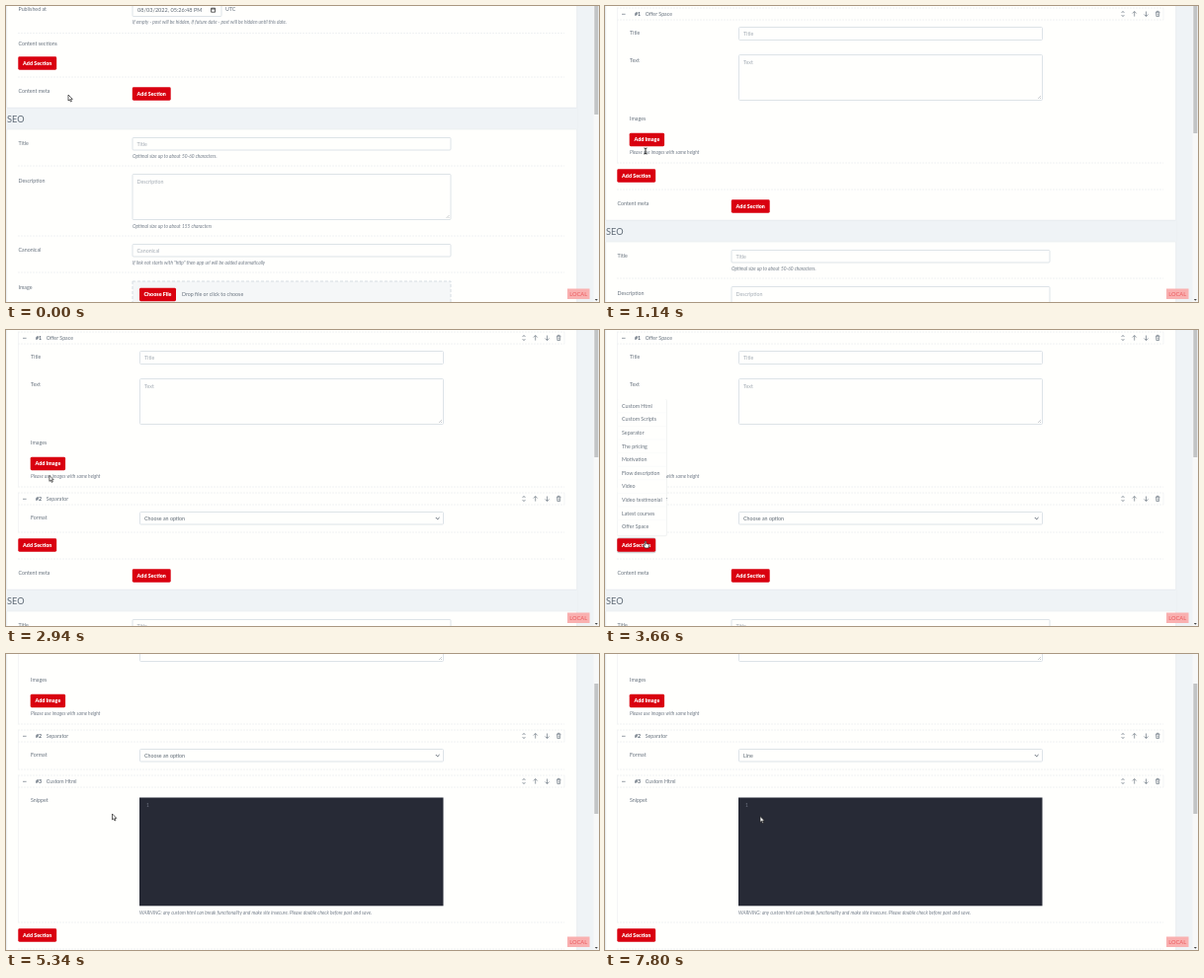
These frames come from a looping animation (600x300 px, 8 s). An HTML page:

```html
<!DOCTYPE html>
<html lang="en">
<head>
<meta charset="utf-8">
<title>Adding content sections</title>
<style>
html, body { margin: 0; width: 100%; height: 100%; overflow: hidden; background: #eff3f6; }
svg { display: block; width: 100vw; height: 100vh; }
text { font-family: Lato, "Open Sans", sans-serif; font-size: 5.3px; fill: #68737f; white-space: pre; }
.hint { font-size: 4.8px; font-style: italic; fill: #737d8a; }
.faint { fill: #a3abb4; }
.strong { font-weight: 700; fill: #566270; }
.button { font-weight: 900; font-size: 5.35px; fill: #fff; text-anchor: middle; }
.heading { font-size: 9.2px; fill: #5f6a76; }
</style>
</head>
<body>
<svg id="stage" viewBox="0 0 600 300" preserveAspectRatio="none"></svg>
<script>
const LOOP = 8000;
const CARD = '#fffffd', RED = '#d9000f', EDGE = '#d5dce2', LINE = '#eff1f2';
const FIRST_Y = 57;
const HEIGHTS = [163, 46, 155];
const ADDED = [600, 2580, 4980];
const MENU_TIMES = [[300, 600], [1740, 2580], [3420, 4980]];
const OPTIONS = ['Custom Html', 'Custom Scripts', 'Separator', 'The pricing', 'Motivation',
  'Flow description', 'Video', 'Video testimonial', 'Latest courses', 'Offer Space'];
const ITEM_STEP = 13.6, ITEM_TOP = -141;

// time, value pairs
const SCROLL = [[600, 0], [840, 49], [5040, 49], [5300, 137]];
const THUMB_END = [[600, 110], [840, 129], [5040, 129], [5300, 162]];

// time, x, y, shape used while heading away from this point
const POINTER = [
  [0, 63, 90, 'arrow'], [60, 63, 90, 'arrow'], [240, 40, 56, 'hand'], [360, 40, 56, 'hand'],
  [540, 42, 39, 'hand'], [660, 42, 40, 'arrow'], [1080, 41, 143, 'beam'], [1140, 41, 147, 'beam'],
  [1260, 42, 157, 'arrow'], [1440, 45, 171, 'hand'], [1800, 46, 171, 'hand'], [2220, 51, 154.5, 'hand'],
  [2520, 48, 56, 'hand'], [2640, 48, 56, 'arrow'], [3180, 41, 212, 'hand'], [3360, 41, 214, 'hand'],
  [4140, 41, 214, 'hand'], [4860, 42.5, 74.5, 'hand'], [5040, 43, 76, 'arrow'], [5340, 107.5, 162, 'arrow'],
  [5700, 150, 112, 'arrow'], [6000, 150, 112, 'arrow'], [6300, 180, 102, 'arrow'], [6660, 180, 102, 'arrow'],
  [6840, 160, 121, 'arrow'], [6960, 160, 121, 'arrow'], [7260, 157, 164.5, 'arrow']
];

const rect = (x, y, w, h, fill, extra = '') =>
  `<rect x="${x}" y="${y}" width="${w}" height="${h}" fill="${fill}" ${extra}/>`;
const label = (x, y, value, cls = '') => `<text x="${x}" y="${y + 1.8}" class="${cls}">${value}</text>`;
const path = (d, color = '#6b7682', width = .7) =>
  `<path d="${d}" fill="none" stroke="${color}" stroke-width="${width}"/>`;
const rule = (y, x = 12, end = 565) =>
  `<path d="M${x} ${y}H${end}" stroke="${LINE}" stroke-width=".9" stroke-dasharray="2 1"/>`;
const box = (x, y, w, h) => rect(x, y, w, h, CARD, `rx="1" stroke="${EDGE}" stroke-width=".8"`);
const field = (x, y, w, h, hint) => box(x, y, w, h) + label(x + 4.5, y + (h > 20 ? 8 : h / 2), hint, 'faint');
const button = (x, cy, w, value) =>
  rect(x, cy - 6.75, w, 13.5, RED, 'rx="1.4"') +
  `<text x="${x + w / 2}" y="${cy + 1.8}" class="button">${value}</text>`;
const grip = (x, y) => path(`M${x - 4} ${y - 1}l3-3M${x - 2} ${y - 1}l1-1`, '#9aa1a8', .5);
const group = (id, content) => `<g id="${id}">${content}</g>`;

function header(number, name) {
  return rule(-6) + rule(6) + path('M12.5-6V6M565-6V6', LINE) + path('M17 .3h3.6') +
    label(30, 0, '#' + number, 'strong') + label(40.7, 0, name) +
    path('M522.6-1l1.4-1.7 1.4 1.7M522.6 1l1.4 1.7 1.4-1.7') +
    path('M535.7 2.6v-5M533.7-.5l2-2 2 2') + path('M547.5-2.5v5M545.5.5l2 2 2-2') +
    path('M557-1.7h4.4M558.3-1.8v-.9h1.8v.9M557.6-1.4l.3 4h2.6l.3-4M559.2-.5v2');
}

function sectionBody(height) {
  return path(`M12.5 6V${height - 12}`, LINE) + rule(height - 12);
}

const topPart =
  label(12.5, 3.5, 'Published at') + box(128, -3, 90, 13.5) +
  '<text x="133" y="5.5" style="font-size:5.55px;fill:#5c6773">08/03/2022, 05:26:48 PM</text>' +
  path('M207.6 2.2h4v4h-4zM207.6 3h4', '#333', .8) + label(222, 3.5, 'UTC') +
  label(128, 16.5, 'If empty - post will be hidden, if future date - post will be hidden until this date.', 'hint') +
  rule(27.5) + label(12.5, 38.5, 'Content sections');

const offer = sectionBody(HEIGHTS[0]) + header(1, 'Offer Space') +
  label(25, 19.5, 'Title') + field(135.5, 13.5, 307, 13, 'Title') +
  label(25, 47.5, 'Text') + field(135.5, 41.5, 307, 46, 'Text') + grip(442, 87) +
  label(25, 105.7, 'Images') + button(24.7, 127.5, 35.4, 'Add Image') +
  label(25, 140.3, 'Please use images with same height', 'hint');

const separator = sectionBody(HEIGHTS[1]) + header(2, 'Separator') + label(25, 19.5, 'Format') +
  rect(134.3, 12.2, 309.4, 15, '#d8e5ef', 'id="ring" rx="2"') + box(135.5, 13.5, 307, 12.5) +
  '<text id="choice" x="140" y="21.5" style="fill:#5d6874"></text>' +
  path('M434.8 19l1.9 1.9 1.9-1.9', '#56616c', .9);

const snippet = sectionBody(HEIGHTS[2]) + header(3, 'Custom Html') + label(25, 19.5, 'Snippet') +
  rect(135, 16.5, 307.5, 109.8, '#272a36') +
  '<text x="142" y="26.3" style="font-size:4.8px;fill:#747987">1</text>' +
  rect(147, 20, .8, 9, '#f0f0f0', 'id="caret"') +
  label(135, 132.7, 'WARNING: any custom html can break functionality and make site insecure. Please double check before past and save.', 'hint');

const tail =
  rect(12, -7.8, 39.5, 16, '#8a929a', 'id="shade" rx="2.5" opacity=".38"') +
  button(12.3, 0, 38.9, 'Add Section') + rule(14) +
  label(12.5, 28.3, 'Content meta') + button(127.8, 31, 38.9, 'Add Section') +
  rect(0, 45, 578, 22, '#eff3f6') + path('M1 45.2H577.5', '#e2e7eb') +
  '<text x="1" y="60.2" class="heading">SEO</text>' + path('M1 67H577.5', '#e8ecef') +
  label(12.5, 81.5, 'Title') + field(128, 75.5, 322, 12.5, 'Title') +
  label(128, 94.5, 'Optimal size up to about 50-60 characters.', 'hint') + rule(104) +
  label(12.5, 119, 'Description') + field(128, 112.5, 322, 46, 'Description') + grip(449.5, 158) +
  label(128, 165, 'Optimal size up to about 155 characters', 'hint') + rule(175) +
  label(12.5, 189, 'Canonical') + field(128, 183.5, 322, 12.5, 'Canonical') +
  label(128, 202.5, 'If link not starts with "http" then app url will be added automatically', 'hint') + rule(212) +
  label(12.5, 227.5, 'Image') +
  rect(128, 221, 322, 27, '#f5f7f8', `stroke="${EDGE}" stroke-dasharray="3 2"`) +
  button(135, 234.5, 37, 'Choose File') + label(178, 234.5, 'Drop file or click to choose');

const menu =
  rect(12, -148, 51, 139.3, '#aeb8c1', 'rx="2" opacity=".16"') +
  rect(12.5, -148, 49.5, 138, CARD, 'rx="1.5"') +
  rect(12.5, 0, 49.5, ITEM_STEP, '#f5f7f8', 'id="hover"') +
  OPTIONS.map((name, i) => {
    const y = ITEM_TOP + i * ITEM_STEP;
    return (i ? path(`M12.5 ${y - 6.8}H62`, '#f7f8f8', .6) : '') + label(17, y, name);
  }).join('');

const popup = rect(135, 26.5, 308.5, 17, '#fff', 'stroke="#9da5ac" stroke-width=".7"') +
  rect(135.4, 35, 307.7, 8, '#dfe6ec', 'id="picked"') +
  label(140, 30.8, 'Choose an option') + label(140, 39, 'Line');

const outline = d => `<path d="${d}" fill="#fff" stroke="#222" stroke-width=".7" stroke-linejoin="round"/>`;
const cursors =
  group('arrow', outline('M0 0V6L1.4 4.8 2.4 7 3.4 6.6 2.5 4.4H4.3Z')) +
  group('hand', outline('M-.7.3Q0-.5.7.3V2.6L3.4 3.2Q4 3.4 3.8 4.3L3.1 7H-.5L-2.5 4.2Q-2.3 3.3-.7 4.4Z')) +
  group('beam', path('M-1.5-3Q0-3 0-2V2Q0 3-1.5 3M1.5-3Q0-3 0-2M0 2Q0 3 1.5 3', '#111', .9));

document.getElementById('stage').innerHTML =
  rect(0, 0, 600, 300, '#eff3f6') + rect(1, 0, 576.5, 300, CARD) +
  path('M.7 0V300M577.8 0V300', '#e5eaed') +
  group('top', topPart) + group('section0', offer) + group('section1', separator) +
  group('section2', snippet) + group('tail', tail) + group('menu', menu) + group('popup', popup) +
  rect(594.5, 0, 5.5, 300, '#f7f8f8') + rect(595.3, 0, 4, 132, '#c2c4c5', 'id="thumb"') +
  '<path d="M595.8 297h3l-1.5 1.7z" fill="#444"/>' +
  rect(568, 286.5, 22.5, 10.5, '#f9b0b0') +
  '<text x="579.2" y="293.7" text-anchor="middle" style="fill:#ea5a5e;font-size:5.7px">LOCAL</text>' +
  group('cursor', cursors);

const el = {};
document.querySelectorAll('[id]').forEach(node => el[node.id] = node);
const show = (node, on) => node.style.display = on ? '' : 'none';
const move = (node, x, y) => node.setAttribute('transform', `translate(${x} ${y})`);
const ease = p => p * p * (3 - 2 * p);
const within = (t, [start, end]) => t >= start && t < end;

function between(keys, t, column = 1) {
  const i = keys.findIndex(key => key[0] > t);
  if (i === 0) return keys[0][column];
  if (i < 0) return keys[keys.length - 1][column];
  const a = keys[i - 1], b = keys[i];
  return a[column] + (b[column] - a[column]) * ease((t - a[0]) / (b[0] - a[0]));
}

function render(t) {
  const scroll = between(SCROLL, t);
  let y = FIRST_Y - scroll;
  move(el.top, 0, -scroll);
  HEIGHTS.forEach((height, i) => {
    const present = t >= ADDED[i];
    show(el['section' + i], present);
    move(el['section' + i], 0, y);
    if (i === 1) move(el.popup, 0, y);
    if (present) y += height;
  });
  y += 1;
  move(el.tail, 0, y);
  move(el.menu, 0, y);

  const x = between(POINTER, t, 1), py = between(POINTER, t, 2);
  const shape = POINTER.filter(key => key[0] <= t).pop()[3];
  move(el.cursor, x, py);
  ['arrow', 'hand', 'beam'].forEach(name => show(el[name], name === shape));

  const open = MENU_TIMES.some(span => within(t, span));
  const item = Math.floor((py + 2 - y - ITEM_TOP) / ITEM_STEP + .5);
  show(el.menu, open);
  show(el.hover, item >= 0 && item < OPTIONS.length);
  el.hover.setAttribute('y', ITEM_TOP + (item - .5) * ITEM_STEP);
  show(el.shade, open && t < 4200);

  show(el.ring, within(t, [6420, 7500]));
  show(el.popup, within(t, [6420, 6900]));
  show(el.picked, t >= 6780);
  el.choice.textContent = t < 6900 ? 'Choose an option' : 'Line';
  show(el.caret, within(t, [7500, 7800]));
  el.thumb.setAttribute('y', between(THUMB_END, t) - 132);
}

const start = performance.now();
function tick() {
  render((performance.now() - start) % LOOP);
  requestAnimationFrame(tick);
}
tick();
</script>
</body>
</html>
```
